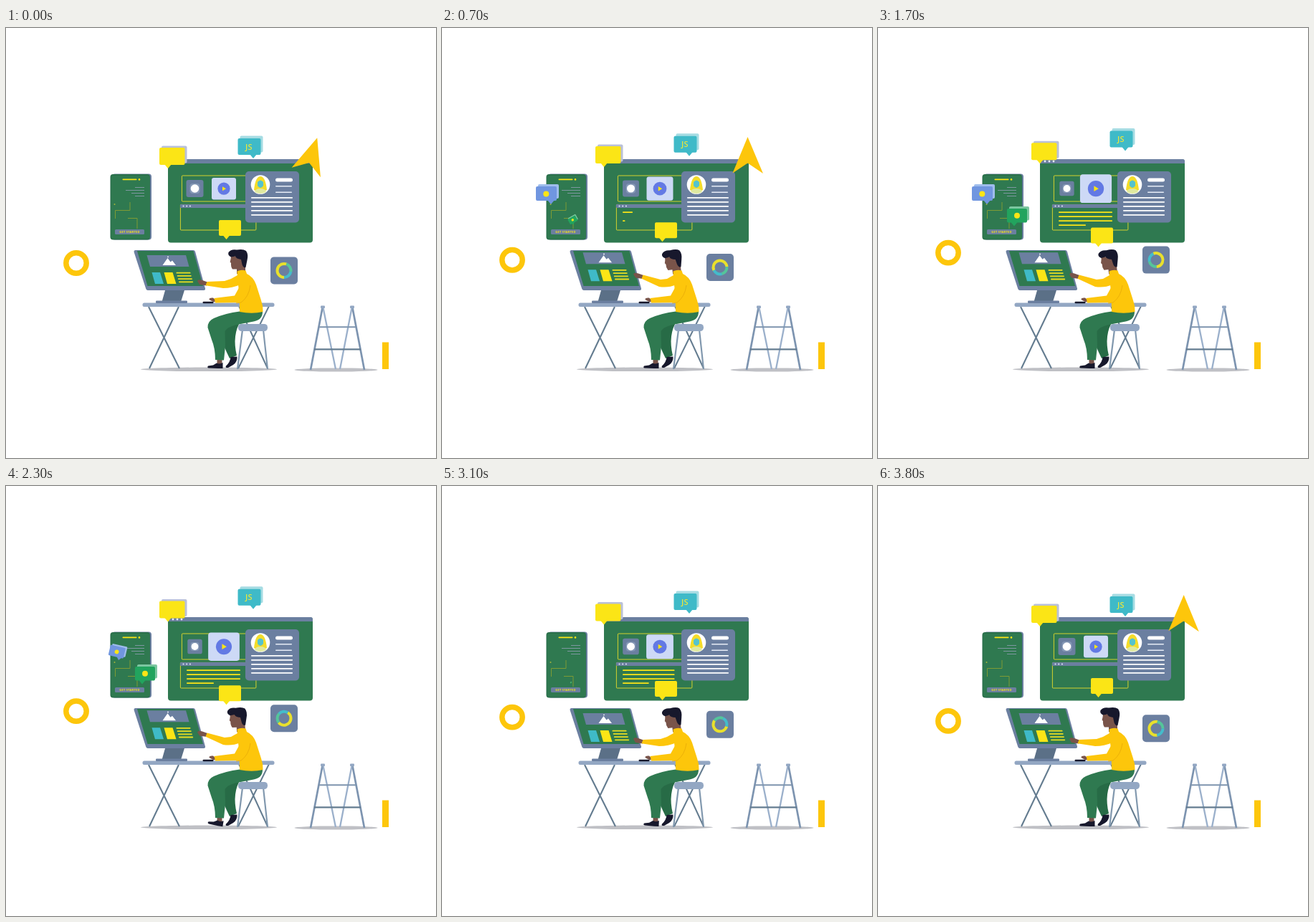
An HTML page that plays this animation: 600 px wide and 600 px high, repeating every 3.9 s.

```html
<!DOCTYPE html>
<html lang="en">
<head>
<meta charset="utf-8">
<title>Designer at work</title>
<style>
html, body { margin: 0; width: 100%; height: 100%; overflow: hidden; background: #fff; }
svg { display: block; width: 100vw; height: 100vh; }
</style>
</head>
<body>
<svg id="stage" viewBox="0 0 600 600" xmlns="http://www.w3.org/2000/svg"></svg>
<script>
const LOOP = 3900, STEP = 100;
const GREEN = '#2f7950', SLATE = '#6b7fa0', PALE = '#93a7c3', STEEL = '#647c90',
      GOLD = '#fdc60b', LEMON = '#fbe516', TEAL = '#3fbac8', INK = '#17182c', SKIN = '#79544a';

const rect = (x, y, w, h, fill, r = 0, more = '') =>
  `<rect x="${x}" y="${y}" width="${w}" height="${h}" rx="${r}" fill="${fill}" ${more}/>`;
const disc = (x, y, r, fill) => `<circle cx="${x}" cy="${y}" r="${r}" fill="${fill}"/>`;
const shape = (d, fill, more = '') => `<path d="${d}" fill="${fill}" ${more}/>`;
const stroke = (d, color, w, more = '') =>
  `<path d="${d}" fill="none" stroke="${color}" stroke-width="${w}" ${more}/>`;
const group = (id, body, more = '') => `<g id="${id}" ${more}>${body}</g>`;
const dots = (x, y, gap, r) => [0, 1, 2].map(i => disc(x + i * gap, y, r, '#e8eefb')).join('');

// Speech bubble: a box, its offset back plate and a tail
function bubble(x, y, w, h, tail, color, back, dx = 3, dy = -3) {
  return (back ? rect(x + dx, y + dy, w, h, back, 2) : '') + rect(x, y, w, h, color, 2) +
    shape(`M${tail - 5} ${y + h - 1}h10l-5 6z`, color);
}

function furniture() {
  return `<ellipse cx="283" cy="476.3" rx="95" ry="2.8" fill="#bfc0c5"/>
    <ellipse cx="460.5" cy="477" rx="58" ry="2.6" fill="#bfc0c5"/>` +
    stroke('M199 389L242 475M241 389L200 475', STEEL, 2.1) +
    stroke('M367 388L324 475M325 388L365 475', STEEL, 2) +
    stroke('M330 421L323 476M359 421L365 476', '#8198ae', 2.2) +
    rect(324, 413, 41, 10, PALE, 4.5) +
    rect(190.5, 383.5, 184, 5.6, PALE, 2.5) +
    stroke('M442 388L425 477M483 388L500 477', '#7d94b0', 2.7) +
    stroke('M442 388L460 476M483 388L466 476', '#9bb0cb', 2.3) +
    stroke('M436 417.3H489', '#7e94ae', 2) + stroke('M430 448.3H495', STEEL, 2.2) +
    rect(439, 387.5, 6, 3.5, PALE, 1) + rect(480, 387.5, 6, 3.5, PALE, 1) +
    rect(525, 438.5, 9, 37.5, GOLD);
}

function browser() {
  return rect(226, 183, 202, 116.5, GREEN, 4) +
    shape('M226 189V186q0-3 3-3H425q3 0 3 3V189z', SLATE) + dots(233, 186, 6, 1.4) +
    rect(245.4, 206, 92, 36, 'none', 1, `stroke="#d3d22e" stroke-width="1"`) +
    group('thumb', rect(-12, -12, 24, 24, SLATE, 3) + rect(-7, -7, 14, 14, '#8497b5', 4) + disc(0, 0, 5.8, '#fff')) +
    group('video', rect(-17, -15.3, 34, 30.6, '#cdd9f6', 3) + disc(0, 0, 8.6, '#6379e4') + shape('M-2-3L3 0-2 3z', LEMON)) +
    rect(243.4, 246.4, 105.5, 35.6, 'none', 1, `stroke="#d3d22e" stroke-width="1"`) +
    rect(243, 246, 106, 5, SLATE, 1) + dots(247.5, 248.5, 4.7, 1) +
    group('code', '') + profile();
}

function profile() {
  let s = rect(334, 200, 75, 71.5, SLATE, 5) + disc(355, 218.5, 13.3, '#fff') +
    shape('M346 226Q348 207 355 207T364 226L360 228H350z', '#f3dc2b') +
    shape('M347 229Q348 224 355 224T363 229Q355 233 347 229z', '#dfe9a0') +
    shape('M351 215Q355 210 359 215V220Q355 226 351 220z', '#55c3cd') +
    rect(376, 209.5, 24, 5, '#fff', 2.5);
  [220, 228.5].forEach(y => s += rect(376, y, 23, 1.5, '#e6ecf6', .7));
  for (let i = 0; i < 5; i++) s += rect(342, 236 + i * 6, 58, 1.8, '#fff', .8);
  return s;
}

function phone() {
  return rect(148, 203.5, 55, 92, SLATE, 4) + rect(145.5, 204, 55.5, 91.5, '#2b704c', 4) +
    rect(147, 206, 53, 88, GREEN, 3) +
    rect(162.5, 210.5, 20, 1.8, LEMON, .8) + disc(186, 211.4, 1.3, LEMON) +
    stroke('M180 222.5h13M167 226.5h26M175 230.5h18M180 234.5h13', '#7d97a0', 1.2) +
    stroke('M152.5 266V254.5H173V243M170 265.5H183V280', '#7e9b35', 1) + disc(151.5, 246, 1, '#a7b53a') +
    rect(152, 281, 41, 7, SLATE, 1.5) +
    `<text x="172.5" y="286.2" text-anchor="middle" font-family="'Open Sans', sans-serif" font-weight="700"
      font-size="4.1" letter-spacing=".2" fill="${LEMON}">GET STARTED</text>`;
}

function monitor() {
  let page = shape('M196.5 317H251L255.5 333H201z', SLATE) +
    shape('M218.5 331L225.5 321 229.5 326.5 232 324.5 237 331z', '#fff') + disc(226, 319.3, .9, '#fff') +
    shape('M203.5 341H215L220 357H208z', TEAL) + shape('M220.5 341H232.5L237.5 357H225z', LEMON);
  for (let i = 0; i < 4; i++) page += rect(237.5 + i * 1.2, 340.8 + i * 4.2, 20, 1.8, '#e8dd22', .7);
  return `<clipPath id="screen"><path d="M183 311H261.5L275 360H197.5z"/></clipPath>` +
    shape('M222 366H249L244 382H217.5z', '#5b7087') + rect(209, 380.5, 44, 3.4, SLATE, 1.2) +
    shape('M180.5 310H261Q263.500 310 264 312L278 363.5Q278.500 366 276 366H198Q196 366 195.300 364L178.700 313Q178 310 180.5 310z', SLATE) +
    shape('M183 311H261.5L275 360H197.5z', GREEN) +
    `<g clip-path="url(#screen)">${group('page', page)}</g>`;
}

function person() {
  const head = shape('M314 317Q314 322 312.6 326.500L314 328Q313.5 333 316 336.500L322 336.500V343H334V322z', SKIN) +
    shape('M314 319.500Q309 317 310.500 313Q314 308 322 309.500Q331 308 335 311Q338.500 316 336.500 324L334.500 334Q331 335 329.500 330L328 323Q321 322 320 318.500z', INK);
  return shape('M300 418L328 408Q315 428 322 457L312 461Q303 443 299 428z', '#276b46') +
    shape('M313.5 459L322.500 458.500Q323 466 317 470L310 474Q305.500 474.500 307 471.500Q313 466 313.500 459z', INK) +
    rect(294.5, 461, 7, 9, SKIN) +
    group('foot', shape('M294 467.500Q298 469.500 302.500 467V475H296L283 474.500Q280 474 282 471.500L289 470.500z', INK)) +
    shape('M326 395.500H358Q358.500 408 343 410L322 414Q309 417 305.500 423L306 444 304 463.500 292 463Q292 447 287 435L281.500 418Q281 409 290 405Q306 398 326 395.500z', GREEN) +
    group('reach', '') + group('head', head) +
    shape('M322.500 339.500Q328 336.500 334.500 338.500L336 343Q345 347 349 358L356 380Q359 388 358.500 396Q343 399.500 326 396L325.500 371 323 350Z', GOLD) +
    shape('M289 376.500Q283 376 283.500 379L290 382.500 294 381z', SKIN) + rect(274.5, 381.8, 15, 2.4, INK, 1.2) +
    shape('M337 350Q343 356 340 365Q336 379 328 383L292 383.500 290.500 377 319 373.500 328 357z', GOLD) +
    stroke('M341 359Q339 375 328 383L321 384', '#eaae0a', .9);
}

function floaters() {
  const arc = (from, len, color) => `<circle r="9.5" fill="none" stroke="${color}" stroke-width="4"
    pathLength="360" stroke-dasharray="${len} ${360 - len}" transform="rotate(${from - 90})"/>`;
  return group('js', bubble(323.5, 154, 32, 23, 345, TEAL, '#a6dce3', 3, -3.5) +
      `<text x="339" y="169.600" text-anchor="middle" font-family="'Open Sans', sans-serif" font-weight="600"
        font-size="11" letter-spacing=".4" fill="#e9e63c">JS</text>`) +
    group('note', bubble(214, 167, 35.5, 24, 226, LEMON, '#b9c0d8', 3, -2.5)) +
    group('hint', bubble(297, 268, 31, 22, 307.5, LEMON)) +
    group('tile', rect(-19, -19, 38, 38, SLATE, 5) +
      group('donut', arc(-100, 200, '#e9e02c') + arc(100, 80, '#55c59a') + arc(180, 80, '#44bccb'))) +
    group('ring', `<circle cx="98" cy="0" r="14.2" fill="none" stroke="${GOLD}" stroke-width="7.500"/>`) +
    group('blue', bubble(131, 221, 29, 20, 152, '#7096e0', '#9fbdec') + disc(145.300, 231.500, 4, LEMON)) +
    group('leaf', bubble(180, 252, 28, 19.500, 190, '#22a45e', '#7cc6a0') + disc(194, 261.800, 4, LEMON)) +
    group('arrow', shape('M0-25L21.500 26 0 11.500-21 25.500z', GOLD));
}

const stage = document.getElementById('stage');
stage.innerHTML = furniture() + browser() + phone() + monitor() + person() + floaters();
const part = {};
stage.querySelectorAll('g[id]').forEach(g => part[g.id] = g);

const ramp = (a, b, t) => Math.min(1, Math.max(0, (t - a) / (b - a)));
const ease = (a, b, t) => { const k = ramp(a, b, t); return k * k * (3 - 2 * k); };
const move = (id, x, y, more = '') =>
  part[id].setAttribute('transform', `translate(${x} ${y}) ${more}`);

function keys(list, t) {
  const i = Math.max(1, list.findIndex(k => k[0] >= t));
  const [a, u] = list[i - 1], [b, v] = list[i];
  return u + (v - u) * ease(a, b, t);
}

// Grow from a corner while untwisting
function pop(id, k, x, y, twist) {
  part[id].setAttribute('visibility', k > .02 ? 'visible' : 'hidden');
  move(id, x, y, `rotate(${twist * (1 - k)}) scale(${k}) translate(${-x} ${-y})`);
}

const NOD = [[0, 0], [700, -7], [1300, -3], [1700, -6], [2300, -3], [3100, -7], [3750, 0], [3900, 0]];
const SWING = [[0, 18], [100, 22], [400, 0], [3790, 0], [3900, 18]];
const LINES = [[550, 800, 75], [720, 850, 75], [660, 850, 75], [1250, 400, 38]];

function draw(t) {
  const c = Math.cos(2 * Math.PI * t / LOOP);
  move('js', 0, -5.5 + 5.5 * c);
  move('note', 0, -3.5 + 3.5 * c);
  move('hint', 0, 5.5 - 5.5 * c);
  move('tile', 388, 330.7 + 7.7 * c);
  move('donut', 0, 0, `rotate(${360 * t / LOOP - 80})`);
  move('ring', 0, 320.5 + 7.5 * c);
  move('video', 304, 224.2, `scale(${1.155 - .155 * c})`);
  move('thumb', 263.5, 224, `scale(${.92 + .08 * c})`);

  pop('blue', ease(300, 650, t) * (1 - ease(2150, 2600, t)), 170, 246, 50);
  pop('leaf', ease(520, 920, t) * (1 - ease(2700, 3180, t)), 180, 276, -50);

  const left = 1 - ramp(3080, 3700, t);
  part.code.innerHTML = LINES.map(([start, time, len], i) => {
    const w = len * ramp(start, start + time, t) * left;
    return w > 0 ? rect(252, 256.2 + i * 6, w, 1.9, LEMON, .8) : '';
  }).join('');

  // Hand drags the page on the monitor
  const up = ease(250, 650, t) * (1 - ease(2500, 3000, t));
  const y = 354.5 - 9.5 * up;
  move('page', 0, -3.8 * up);
  part.reach.innerHTML =
    shape(`M281 ${y}L274 ${y - 2.5}Q268 ${y - 4.5} 267 ${y - 1.5}L270 ${y + 3.5} 280 ${y + 5}z`, SKIN) +
    shape(`M327 343Q319 347 314 350L305 ${353 - 2 * up}L280.5 ${y - .5}L278.500 ${y + 4.800}L303 ${363 - 2 * up}Q316 363 327 358z`, GOLD);

  part.head.setAttribute('transform', `rotate(${keys(NOD, t)} 327 342)`);
  const beat = t / (LOOP / 4) % 1;
  const tap = Math.max(0, 1 - Math.abs(beat - .35) / .25);
  part.foot.setAttribute('transform', `rotate(${10 * tap} 301 474)`);

  const lift = 67 * ramp(1100, 1400, t);
  const seen = t <= 1400 ? 1 : ease(3350, 3700, t);
  part.arrow.setAttribute('opacity', seen);
  move('arrow', 426.5, 177 - (t <= 1400 ? lift : 0), `rotate(${keys(SWING, t)})`);
}

const begin = performance.now();
function tick() {
  const t = (performance.now() - begin) % LOOP;
  draw(Math.floor(t / STEP) * STEP);
  requestAnimationFrame(tick);
}
tick();
</script>
</body>
</html>
```
